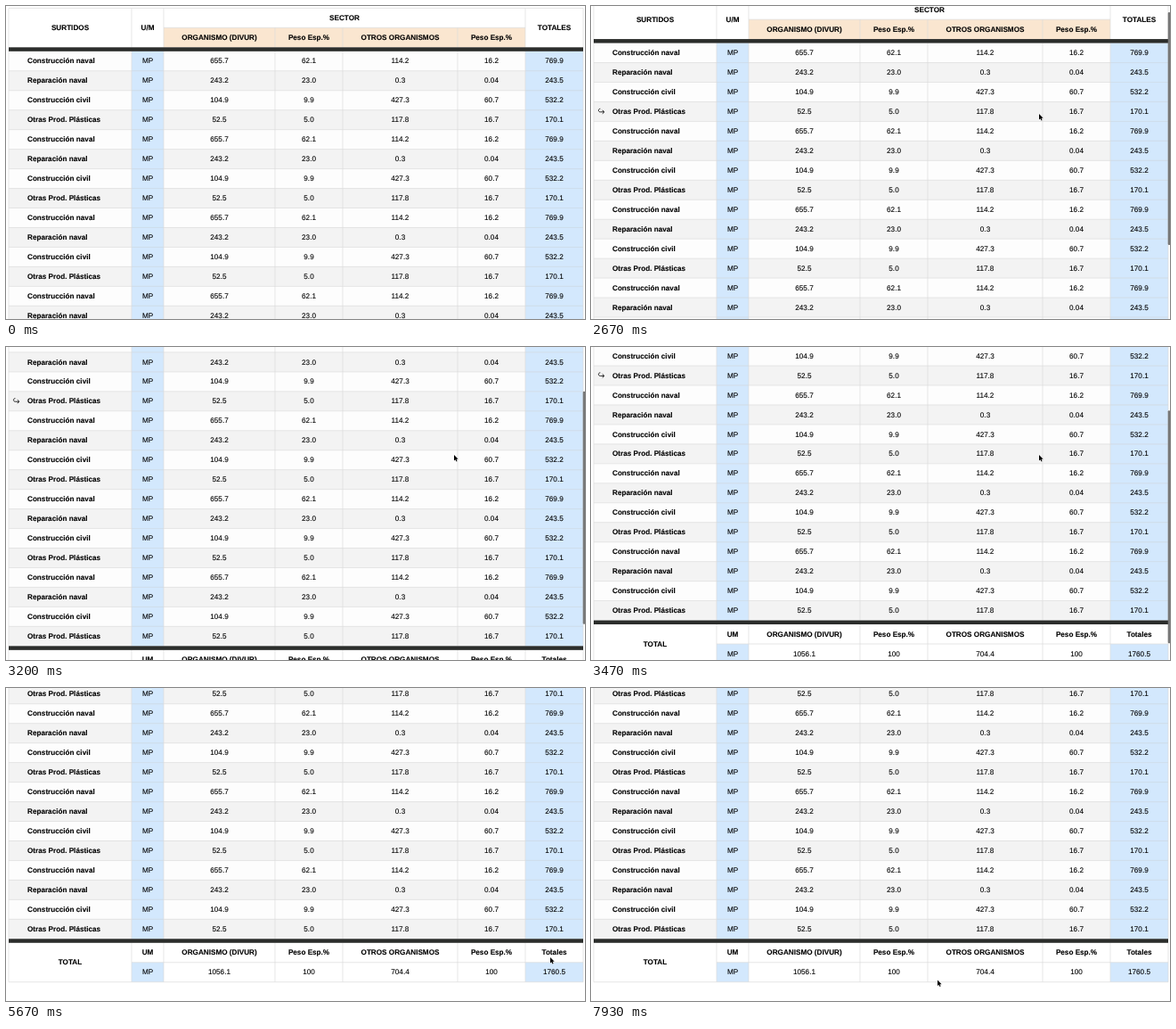
An HTML page that plays this animation: 650 px wide and 351 px high, repeating every 8000 ms.

```html
<!DOCTYPE html>
<html lang="es">
<head>
<meta charset="utf-8">
<style>
  html, body { margin: 0; width: 100%; height: 100%; overflow: hidden; background: #fff; }
  svg { display: block; width: 650px; height: 351px; }
  text { font: 8.16px "Liberation Sans", Arial, sans-serif; stroke: #000; stroke-width: .1; text-anchor: middle; text-rendering: geometricPrecision; }
  .bold { font-weight: bold; }
  .left { text-anchor: start; }
  .line { stroke: #dcdcdc; stroke-width: .7; }
  .blueLine { stroke: #cbdff1; stroke-width: .7; }
</style>
</head>
<body>
<svg viewBox="0 0 650 351">
  <g id="table"></g>
  <path id="arrow" d="M10.4 -3.2C7.8 -3.2 7.8 .4 10.4 .4H14.8M12.8 -1.6L14.9 .4L12.8 2.4" fill="none" stroke="#111" stroke-width=".9"/>
  <rect id="thumb" x="647.7" width="2.6" rx="1.2" fill="#767676"/>
  <path id="cursor" d="M0 0V7.2L1.7 5.7L2.8 8.3L4 7.8L2.9 5.2H5.2Z" stroke="#fff" stroke-width=".7" paint-order="stroke"/>
</svg>
<script>
const DURATION = 8000, STEP = 1000 / 15, VIEW = 351;
const COLS = [3, 141, 177, 302, 378, 507, 583, 648];
const ROW = 21.96, BAR = 4.5, ROW_COUNT = 16;
const HEADER_TOP = 2.4, HEADER_MID = HEADER_TOP + ROW, HEADER_END = HEADER_MID + ROW;
const BODY_TOP = HEADER_END + BAR, BODY_END = BODY_TOP + ROW * ROW_COUNT;
const TOTAL_TOP = BODY_END + BAR, TOTAL_MID = TOTAL_TOP + ROW, TOTAL_END = TOTAL_MID + ROW;
const BLUE = '#d3e8fd', PEACH = '#fae6d0', DARK = '#2b2d2b';

const GROUPS = ['ORGANISMO (DIVUR)', 'Peso Esp.%', 'OTROS ORGANISMOS', 'Peso Esp.%'];
const SUMS = [1056.1, 704.4];
const ITEMS = [
  ['Construcción naval', 655.7, 114.2, 769.9],
  ['Reparación naval', 243.2, 0.3, 243.5],
  ['Construcción civil', 104.9, 427.3, 532.2],
  ['Otras Prod. Plásticas', 52.5, 117.8, 170.1]
];

const $ = id => document.getElementById(id);
const center = col => (COLS[col] + COLS[col + 1]) / 2;
const rowCenter = i => BODY_TOP + (i + .5) * ROW;
const share = (value, sum) => {
  const percent = 100 * value / sum;
  return percent.toFixed(percent < .1 ? 2 : 1);
};

const parts = [];
const rect = (x1, y1, x2, y2, fill) =>
  parts.push(`<rect x="${x1}" y="${y1}" width="${x2 - x1}" height="${y2 - y1}" fill="${fill}"/>`);
const line = (x1, y1, x2, y2, cls = 'line') =>
  parts.push(`<path d="M${x1} ${y1}L${x2} ${y2}" class="${cls}"/>`);
const label = (s, x, y, cls = '') =>
  parts.push(`<text x="${x}" y="${y + 2.6}" class="${cls}">${s}</text>`);
const labels = (texts, firstCol, y, cls) =>
  texts.forEach((s, i) => label(s, center(firstCol + i), y, cls));
const blueCells = (top, bottom) => {
  rect(COLS[1], top, COLS[2], bottom, BLUE);
  rect(COLS[6], top, COLS[7], bottom, BLUE);
};
const rowLine = y => {
  line(COLS[0], y, COLS[7], y);
  line(COLS[1], y, COLS[2], y, 'blueLine');
  line(COLS[6], y, COLS[7], y, 'blueLine');
};

function buildHeader() {
  rect(COLS[2], HEADER_MID, COLS[6], HEADER_END, PEACH);
  line(COLS[0], HEADER_TOP, COLS[7], HEADER_TOP);
  line(COLS[2], HEADER_MID, COLS[6], HEADER_MID);
  COLS.forEach((x, i) => line(x, i > 2 && i < 6 ? HEADER_MID : HEADER_TOP, x, HEADER_END));
  label('SURTIDOS', center(0), HEADER_MID, 'bold');
  label('U/M', center(1), HEADER_MID, 'bold');
  label('SECTOR', (COLS[2] + COLS[6]) / 2, HEADER_TOP + ROW / 2, 'bold');
  label('TOTALES', center(6), HEADER_MID, 'bold');
  labels(GROUPS, 2, HEADER_MID + ROW / 2, 'bold');
}

function buildBody() {
  for (let i = 0; i < ROW_COUNT; i++)
    rect(COLS[0], BODY_TOP + i * ROW, COLS[7], BODY_TOP + (i + 1) * ROW, i % 2 ? '#f3f3f3' : '#fdfdfd');
  blueCells(BODY_TOP, BODY_END);
  for (let i = 1; i < ROW_COUNT; i++) rowLine(BODY_TOP + i * ROW);
  COLS.forEach(x => line(x, BODY_TOP, x, BODY_END));
  for (let i = 0; i < ROW_COUNT; i++) {
    const [name, own, other, total] = ITEMS[i % ITEMS.length];
    label(name, 24, rowCenter(i), 'bold left');
    labels(['MP', own, share(own, SUMS[0]), other, share(other, SUMS[1]), total], 1, rowCenter(i));
  }
}

function buildTotals() {
  blueCells(TOTAL_MID, TOTAL_END);
  line(COLS[1], TOTAL_MID, COLS[7], TOTAL_MID);
  line(COLS[0], TOTAL_END, COLS[7], TOTAL_END);
  COLS.forEach(x => line(x, TOTAL_TOP, x, TOTAL_END));
  label('TOTAL', center(0), TOTAL_MID, 'bold');
  labels(['UM', ...GROUPS, 'Totales'], 1, TOTAL_TOP + ROW / 2, 'bold');
  labels(['MP', SUMS[0], 100, SUMS[1], 100, (SUMS[0] + SUMS[1]).toFixed(1)], 1, TOTAL_MID + ROW / 2);
}

buildHeader();
buildBody();
buildTotals();
rect(COLS[0], HEADER_END, COLS[7], BODY_TOP, DARK);
rect(COLS[0], BODY_END, COLS[7], TOTAL_TOP, DARK);
$('table').innerHTML = parts.join('');

const MAX_SCROLL = 120.9, OVERSCROLL = .7, THUMB_RATIO = VIEW / (VIEW + MAX_SCROLL);
$('thumb').setAttribute('height', VIEW * THUMB_RATIO);

const ramp = (t, from, to) => Math.min(1, Math.max(0, (t - from) / (to - from)));
const smooth = p => p * p * (3 - 2 * p);

// Constant speed, then uniform braking to just past the end, then a small settle.
function scrollAt(t) {
  const speed = .108, start = 2581, brake = 3467;
  const cruise = speed * (Math.min(Math.max(t, start), brake) - start);
  const rest = MAX_SCROLL + OVERSCROLL - speed * (brake - start);
  const p = ramp(t, brake, brake + 2 * rest / speed);
  return cruise + rest * p * (2 - p) - OVERSCROLL * ramp(t, 4400, 4530);
}

// Cursor moves: from, to, target x, target y
const MOVES = [
  [1000, 2000, 503, 121],
  [4470, 5200, 607, 291],
  [5270, 5530, 611, 302],
  [5670, 7200, 621, 311],
  [7610, 7930, 389, 327.5]
];
function cursorAt(t) {
  let x = 545, y = -14;
  for (const [from, to, toX, toY] of MOVES) {
    const p = smooth(ramp(t, from, to));
    x += (toX - x) * p;
    y += (toY - y) * p;
  }
  return [x, y + 18 * Math.sin(Math.PI * ramp(t, 5670, 7200))];
}

function draw(now) {
  const t = Math.floor((now % DURATION + 5) / STEP) * STEP % DURATION;
  const scroll = scrollAt(t), [x, y] = cursorAt(t);
  // The hovered row is only refreshed once scrolling has settled.
  const hoverScroll = t < 3860 ? 0 : scroll;
  const row = Math.floor((y + hoverScroll - BODY_TOP) / ROW);

  $('table').setAttribute('transform', `translate(0 ${-scroll})`);
  $('cursor').setAttribute('transform', `translate(${x} ${y}) scale(.9)`);
  $('arrow').setAttribute('transform', `translate(0 ${rowCenter(row) - scroll})`);
  $('arrow').setAttribute('opacity', row >= 0 && row < ROW_COUNT ? 1 : 0);
  $('thumb').setAttribute('y', scroll * THUMB_RATIO);
  $('thumb').setAttribute('opacity', ramp(t, 2500, 2600) * (1 - ramp(t, 4470, 4800)));
}

const start = performance.now();
function tick() {
  draw(performance.now() - start);
  requestAnimationFrame(tick);
}
tick();
</script>
</body>
</html>
```
